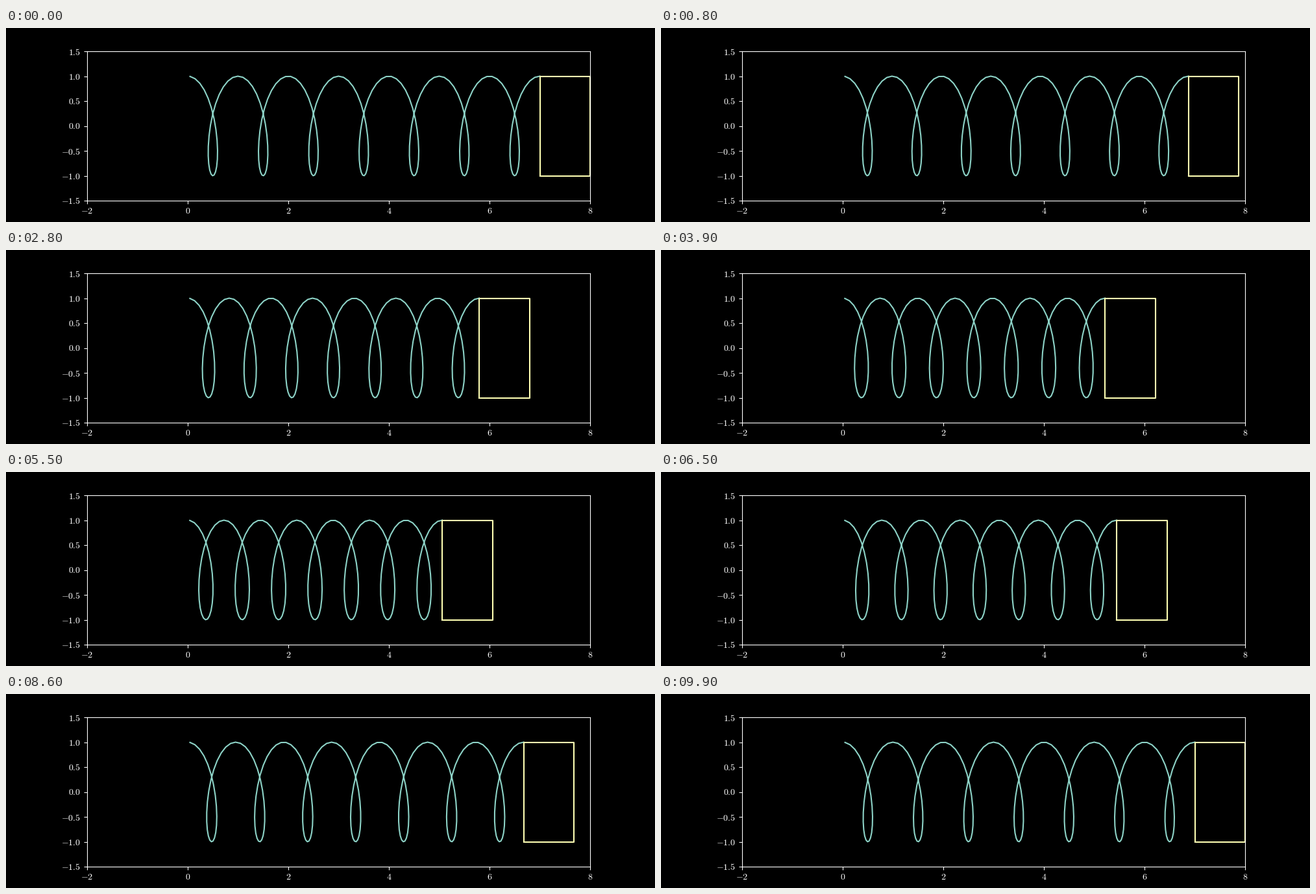
These frames come from a looping animation (1000 by 300 pixels, 10000 ms). A matplotlib script:

```python
import numpy as np
import matplotlib.pyplot as plt
from matplotlib.animation import FuncAnimation

FRAMES = 100
COILS = 7
COIL_RADIUS = 0.3

plt.style.use("dark_background")
plt.rcParams.update({"font.family": "Liberation Serif", "mathtext.fontset": "cm"})

fig, ax = plt.subplots(figsize=(10, 3), dpi=100)
ax.set(xlim=(-2, 8), ylim=(-1.5, 1.5))
x_ticks = np.arange(-2, 9, 2)
y_ticks = np.arange(-1.5, 1.6, 0.5)
ax.set_xticks(x_ticks, [f"${x}$" for x in x_ticks])
ax.set_yticks(y_ticks, [f"${y:.1f}$" for y in y_ticks])

angle = np.linspace(0.1, 2 * np.pi * COILS, 200)
phase = np.linspace(0, 2 * np.pi, FRAMES)

spring, = ax.plot([], [], color="#8dd3c7")
block, = ax.plot([], [], color="#feffb3")


def update(frame):
    length = 6 + np.cos(phase[frame])
    turns = angle / (2 * np.pi * COILS)
    spring.set_data(length * turns + COIL_RADIUS * np.sin(angle), np.cos(angle))
    block.set_data(length + np.array([0, 1, 1, 0, 0]), [-1, -1, 1, 1, -1])
    return spring, block


anim = FuncAnimation(fig, update, frames=FRAMES, interval=100, repeat=True)
plt.show()
```
